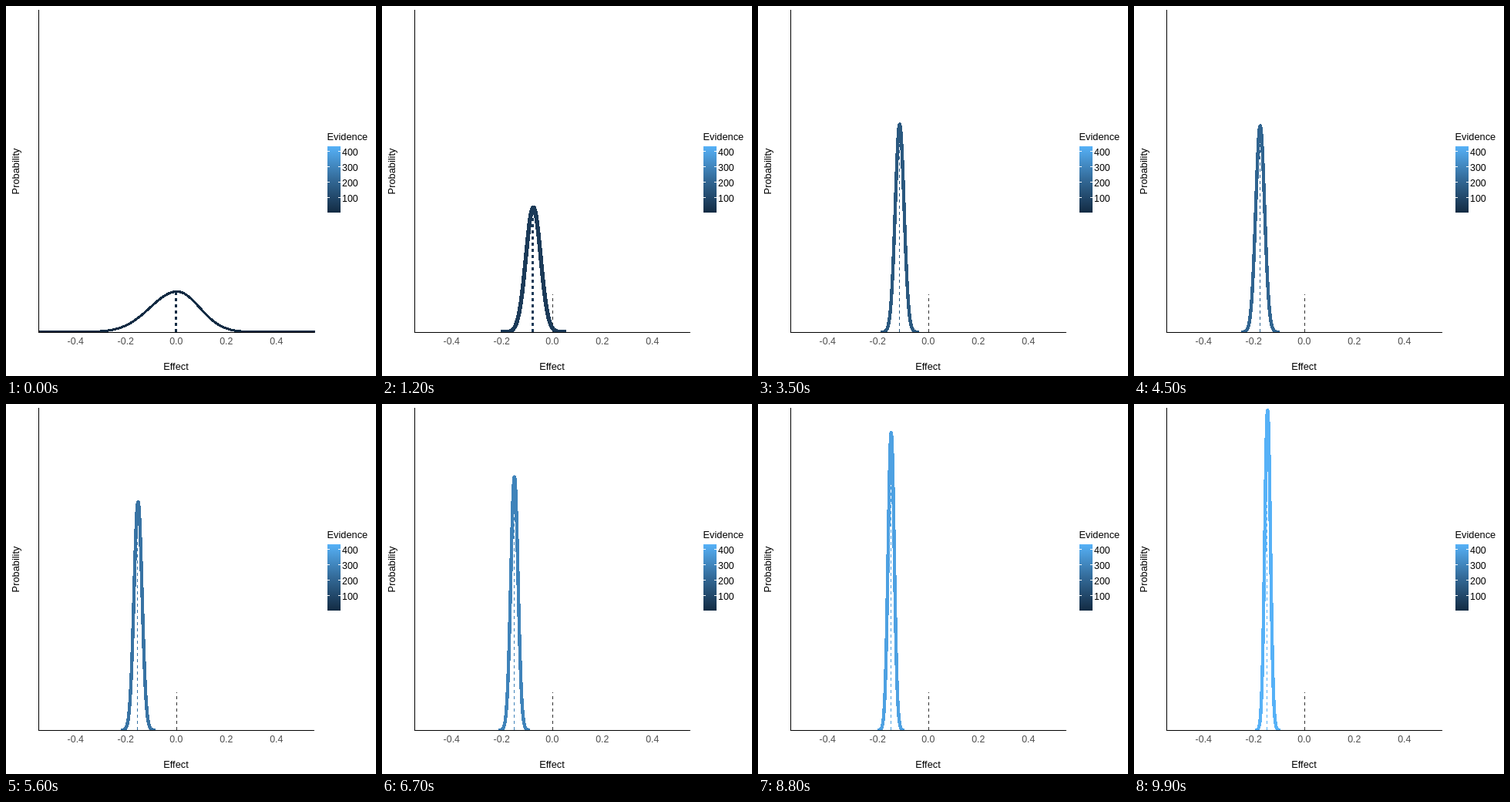
Animation, 480 px wide and 480 px high, one loop 10000 ms. Source, as an HTML page:

```html
<!DOCTYPE html>
<html lang="en">
<head>
<meta charset="utf-8">
<title>Evidence and effect</title>
<style>
  html, body { margin: 0; width: 100%; height: 100%; overflow: hidden; background: #fff; }
  svg { display: block; width: 480px; height: 480px; }
  text { font: 12.8px "Liberation Sans", Arial, sans-serif; }
  .num { font-size: 12.4px; }
  .crisp { shape-rendering: crispEdges; fill: none; }
</style>
</head>
<body>
<svg viewBox="0 0 480 480">
  <defs>
    <linearGradient id="scale" x1="0" y1="0" x2="0" y2="1">
      <stop offset="0" stop-color="#56b1f7"/>
      <stop offset=".5" stop-color="#336a98"/>
      <stop offset="1" stop-color="#132b43"/>
    </linearGradient>
    <clipPath id="panel"><rect x="43" y="5" width="358" height="419"/></clipPath>
  </defs>
  <g class="crisp" clip-path="url(#panel)">
    <path stroke="#333" stroke-dasharray="4 4" d="M221.5 423V374"/>
    <path id="mean" stroke-dasharray="4 4"/>
    <path id="curve" stroke-linejoin="round"/>
  </g>
  <path class="crisp" stroke="#000" d="M42.5 5V424M42 423.5H400"/>
  <text x="220.5" y="472" text-anchor="middle">Effect</text>
  <text transform="translate(16.5 214.5) rotate(-90)" text-anchor="middle">Probability</text>
  <text x="416.5" y="174">Evidence</text>
  <rect x="417" y="182" width="17" height="86" fill="url(#scale)"/>
  <g id="labels"></g>
</svg>
<script>
const $ = id => document.getElementById(id);
const FRAMES = 100, FRAME_MS = 100, BASE = 423;

// [step, value] points: centre of the curve, and its height per root of evidence
const centres = [[0, 221], [12, 196.3], [22, 188.5], [35, 183.8], [44, 163], [56, 171.3], [99, 173.3]];
const ratios = [[0, 23.5], [12, 21.4], [35, 21.5], [44, 18.9], [56, 18.8], [99, 19.9]];
const colours = [[19, 43, 67], [51, 106, 152], [86, 177, 247]];
const mix = (a, b, u) => a + (b - a) * u;

function along(points, step) {
  const i = Math.max(1, points.findIndex(p => p[0] >= step));
  const [s0, v0] = points[i - 1], [s1, v1] = points[i];
  return mix(v0, v1, (step - s0) / (s1 - s0));
}

function colour(u) {
  const i = u < .5 ? 0 : 1;
  return `rgb(${colours[i].map((c, j) => Math.round(mix(c, colours[i + 1][j], u * 2 - i)))})`;
}

// The prior is skewed and wide-tailed; prior fades from 1 to 0 as evidence arrives
function bell(centre, height, prior) {
  const sigma = 1530 / height;
  const span = sigma * (4.4 + 2.6 * prior);
  let d = "";
  for (let i = 0; i <= 160; i++) {
    const dx = (i / 80 - 1) * span;
    const z = dx / (sigma * (dx < 0 ? 1 + .2 * prior : 1));
    const x = centre + prior + dx, y = BASE - height * Math.exp(-z * z / 2);
    d += `${i ? "L" : "M"}${x.toFixed(2)} ${y.toFixed(2)}`;
  }
  return d;
}

function set(id, attrs) {
  for (const name in attrs) $(id).setAttribute(name, attrs[name]);
}

function draw(step) {
  const centre = along(centres, step);
  const height = along(ratios, step) * Math.sqrt(mix(5, 435, step / 99));
  const prior = Math.exp(-step / 4);
  const stroke = colour(step / 99);
  const early = step < 29;
  const x = Math.round(centre) - .5;
  const width = (early ? 5.6 : 4.4) - 2.4 * prior;
  set("curve", { d: bell(centre, height, prior), stroke, "stroke-width": width });
  set("mean", { d: `M${x} 423V${BASE - height}`, stroke, "stroke-width": early ? 3 : 1 });
}

let labels = "";
for (let v = -.4; v < .5; v += .2) {
  const minus = v < -.1;
  labels += `<text class="num" x="${220.8 + v * 325 - minus / 2}" y="439" text-anchor="middle"
    fill="#4d4d4d">${minus ? "-" : ""}${Math.abs(v).toFixed(1)}</text>`;
}
for (let v = 100; v <= 400; v += 100) {
  const y = 269 - v / 5;
  labels += `<path class="crisp" stroke="#fff" d="M417 ${y - .5}h3m11 0h3"/>
    <text class="num" x="436" y="${y + 4.5}">${v}</text>`;
}
$("labels").innerHTML = labels;

const start = performance.now();
function tick() {
  draw(Math.floor((performance.now() - start) / FRAME_MS) % FRAMES);
  requestAnimationFrame(tick);
}
tick();
</script>
</body>
</html>
```
